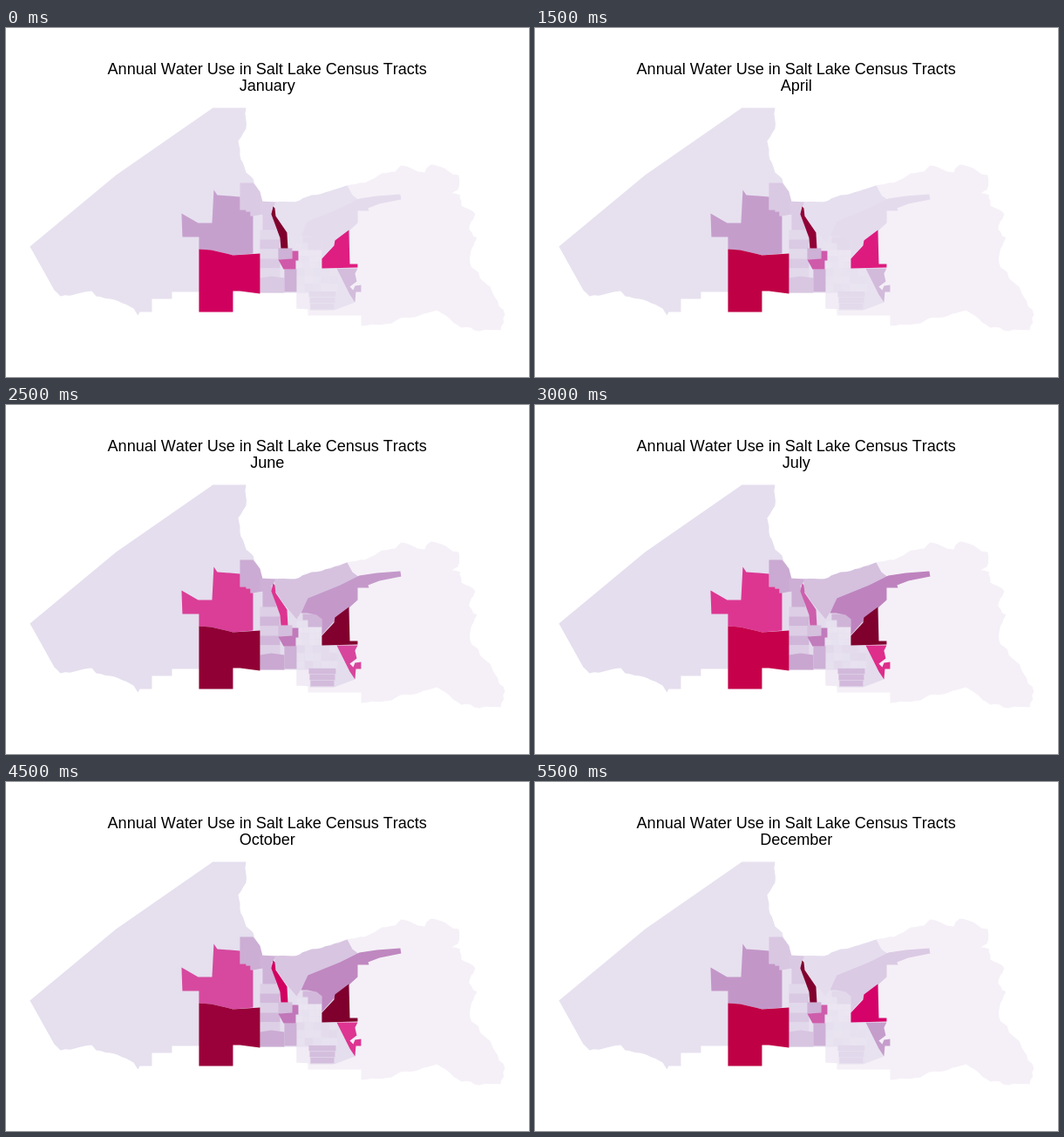
These frames come from a looping animation (600 px wide and 400 px high, 6000 ms). An HTML page:

```html
<!DOCTYPE html>
<html lang="en">
<head>
<meta charset="utf-8">
<title>Water use by tract</title>
<style>
  html, body { margin: 0; width: 100%; height: 100%; overflow: hidden; background: #fff; }
  svg { display: block; width: 600px; height: 400px; }
  text {
    font: 18px "Liberation Sans", Arial, Helvetica, sans-serif;
    font-kerning: none;
    text-anchor: middle;
  }
</style>
</head>
<body>
<svg viewBox="0 0 600 400">
  <g id="map" transform="translate(.4 .4)"></g>
  <text x="299.7" y="53">Annual Water Use in Salt Lake Census Tracts</text>
  <text id="month" x="299.7" y="72">January</text>
</svg>
<script>
const STEP = 500;
const MONTHS = ["January", "February", "March", "April", "May", "June", "July",
  "August", "September", "October", "November", "December"];

// Colours for levels 0 (low use) to 12 (high use)
const RAMP = ["f5f0f7", "e6e0ef", "d3bcdc", "c6a0cd", "be84be", "c370b6", "d157a8",
  "dc3a94", "df2184", "d40068", "c40046", "9a003a", "7f002d"]
  .map(h => [0, 2, 4].map(i => parseInt(h.slice(i, i + 2), 16)));

function color(level) {
  const v = Math.min(Math.max(level, 0), RAMP.length - 1);
  const i = Math.min(Math.floor(v), RAMP.length - 2), f = v - i;
  return `rgb(${RAMP[i].map((c, k) => Math.round(c + (RAMP[i + 1][k] - c) * f))})`;
}

const sigmoid = x => 1 / (1 + Math.exp(-x));
const bump = (m, mid, width) => Math.exp(-(((m - mid) / width) ** 2));

// Level by month: winter value, summer value, and when summer sets in and ends
const season = (winter, summer, rise = 4.2, fall = 9.8, speed = 3) => m =>
  winter + (summer - winter) * sigmoid((m - rise) * speed) * sigmoid((fall - m) * 2);

let seed = 7;
const random = () => (seed = (seed * 16807) % 2147483647) / 2147483647;

// Break a line of key points into a ragged natural edge
function rough(keys, amp = 1.6, step = 6) {
  const pts = keys.trim().split(/\s+/).map(p => p.split(",").map(Number));
  const out = [pts[0]];
  for (let i = 1; i < pts.length; i++) {
    const [ax, ay] = pts[i - 1], [bx, by] = pts[i];
    const n = Math.ceil(Math.hypot(bx - ax, by - ay) / step);
    for (let k = 1; k < n; k++) {
      const jitter = () => (random() * 2 - 1) * amp;
      out.push([ax + (bx - ax) * k / n + jitter(), ay + (by - ay) * k / n + jitter()]);
    }
    out.push(pts[i]);
  }
  return out.map(p => p.map(v => v.toFixed(1)).join()).join(" ");
}

const box = (x, y, w, h) => `${x},${y} ${x + w},${y} ${x + w},${y + h} ${x},${y + h}`;
const map = document.getElementById("map");
const label = document.getElementById("month");
const tracts = [];

function tract(points, level) {
  const el = document.createElementNS("http://www.w3.org/2000/svg", "polygon");
  el.setAttribute("points", points);
  map.append(el);
  tracts.push({ el, level });
}

// Western plain, eastern mountains, city ground
tract("27,250 126,168 237,91 " +
  rough("275,91 275,115 266,129 269,150 275,165 283,172 294,199", 1) +
  " 294,260 221,302 190,302 190,310 167,310 167,325 153,325 151,329 " +
  rough("146,321 124,311 103,307 98,301 78,305 62,307 55,300", .8), season(.95, 1.05));
tract(rough(`391,180 411,177 431,166 446,164 453,157 480,165 487,156 519,168 518,185
  511,189 521,191 522,203 538,213 531,230 540,240 534,252 532,269 551,293 572,328
  567,346 546,346 522,343 494,323`) + " " +
  rough("494,323 468,331 452,332 442,338 407,341", .6) +
  " 407,329 346,329 346,321 333,321 333,303 380,199", season(0, 0));
tract(`283,213 294,199 331,199 391,180 403,209 403,223 394,231 394,270 380,275
  400,314 376,323 348,323 348,308 333,303 291,303 283,258`, season(.88, 1.1));
tract("333,303 348,303 348,322 333,321", season(.25, .3));

// Central street blocks
function blocks(x, y, cols, rows, w, h, winter, summer) {
  for (let i = 0; i < cols * rows; i++) {
    const shade = (random() - .5) * .3;
    tract(box(x + i % cols * w, y + Math.floor(i / cols) * h, w - .2, h - .2),
      season(winter + shade, summer + shade));
  }
}
blocks(333, 247, 4, 4, 7.2, 7, .75, .85);
blocks(333, 275, 5, 3, 9.4, 9, .85, 1.05);
tract("340,239 356,239 362,245 362,254 346,254 346,246 340,246", season(1.1, 2.3));
for (let i = 0; i < 3; i++) tract(box(347 + i, 301.5 + i * 7, 31 - i * 2, 6.5), season(1.15, 2.1));

// West side: every other row uses more
for (let i = 0; i < 5; i++)
  tract(box(291, 231 + i * 11, 23, 11), i % 2 ? season(1.6, 2.2) : season(1.2, 1.5));
tract("291,286 304,284 319,286 319,303 291,303", season(1.65, 2.8));
tract(box(319, 276, 14, 26), season(2.4, 2.4));
tract(box(312, 252, 16, 13), season(2.4, 1.9));
tract("328,255 335,255 335,266 332,266 332,276 318,276 312,265 328,264", season(5.9, 4.4));

// Northern edge, foothills and canyon
tract("268,177 283,177 291,187 294,199 294,213 283,215 280,215 280,210 275,210 275,208 268,208",
  season(1.6, 2.7));
tract("291,198 310,199 304,207 310,231 294,231 294,213 291,213", season(1.55, 2.5));
tract(rough("308,199 331,199 345,193 362,190 391,180", .8) +
  " 397,191 405,197 346,223 338,237 333,245 318,227 308,212", season(1, 1.9));
tract(`338,238 346,221 383,206 405,195 425,192 452,190 453,196 428,201 415,206 416,209
  403,209 403,223 393,232 378,245 362,263 362,245 356,240 345,238`,
  season(1.1, 4.1, 4.7, 10.2));

// Heavy users
tract(`201,212 220,223 236,223 238,185 242,191 268,193 268,208 275,208 275,210
  280,210 280,215 283,215 283,258 260,260 235,254 221,253 221,239 202,239`, season(3, 7.2));
tract("221,253 235,254 260,260 291,258 291,304 268,301 260,301 260,325 221,325",
  m => 9.3 + .05 * m + 2.7 * bump(m, 4.3, 1.1) + 1.25 * bump(m, 9, 1.6));
tract("306,204 308,206 309,215 322,234 323,252 315,252 314,240 304,213",
  season(12, 5, 4.5, 8.8, 1.5));
tract("393,231 394,270 403,270 403,274 362,275 362,264 376,249 377,243",
  season(8.1, 12.4, 4.3, 10.3));
tract(`379,275 403,275 400,281 402,290 394,296 398,300 400,295 407,294 407,302
  401,302 400,314 394,305`, season(2, 7.6, 4.5, 10.3));

let shown = -1;
function draw(time) {
  const m = Math.floor(time / STEP) % MONTHS.length;
  if (m === shown) return;
  shown = m;
  label.textContent = MONTHS[m];
  for (const t of tracts) t.el.setAttribute("fill", color(t.level(m)));
}

let start = null;
function tick(now) {
  start ??= now;
  draw(now - start);
  requestAnimationFrame(tick);
}
draw(0);
requestAnimationFrame(tick);
</script>
</body>
</html>
```
